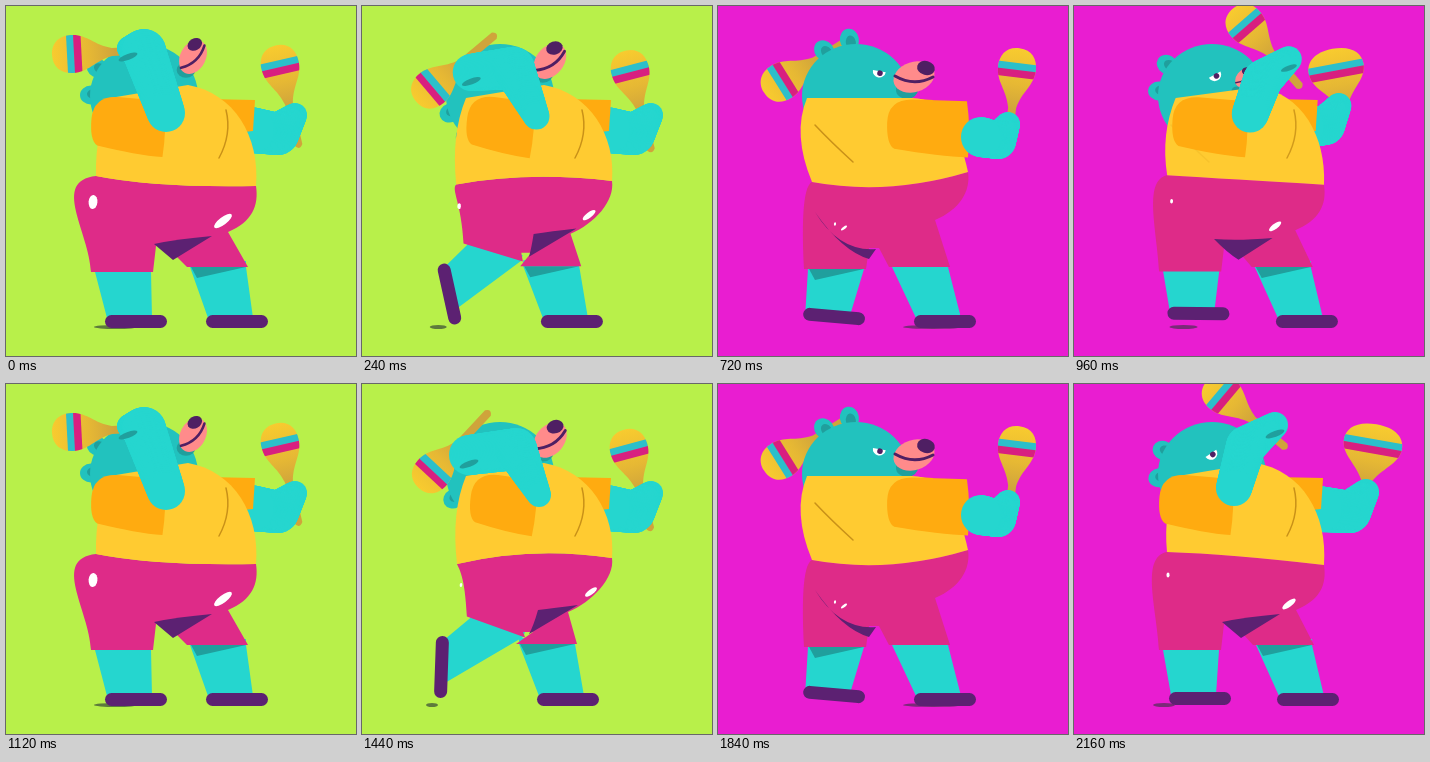
Write an HTML page with a canvas that moves like this. It is 350x350 px and loops after 2.24 s.

```html
<!DOCTYPE html>
<html lang="en">
<head>
<meta charset="utf-8">
<title>Dancing bear with maracas</title>
<style>
html, body { margin: 0; width: 100%; height: 100%; overflow: hidden; background: #b8f04a; }
canvas { display: block; width: 100vw; height: 100vh; }
</style>
</head>
<body>
<canvas id="stage" width="350" height="350"></canvas>
<script>
const ctx = document.getElementById('stage').getContext('2d');
const STEP = 80, STEPS = 14, RAD = Math.PI / 180;
const C = {
  green: '#b8f04a', pink: '#e91dd1', teal: '#25d6cf', head: '#22c2be', deep: '#209f9d',
  shirt: '#ffcb31', sleeve: '#ffab10', shorts: '#de2b88', purple: '#5c2172',
  muzzle: '#ff8b8b', nose: '#4f1f63', fold: '#c99118'
};

// Joints are x, y with an angle, size or radius; arms list hand, wrist, elbow.
const back = {
  lean: [1], head: [-53], muzzle: [187, 51, -45, .85], eye: [142, 62, -40],
  waist: [90, 170, 150, 182, 250, 180], butt: [45], notch: [222, 226], crotch: [155, 240],
  fold: [148, 238, 206, 230, 167, 254],
  hemL: [116, 266, 0], hemR: [211, 261, 0], footL: [130, 316, 0], footR: [231, 316, 0],
  sleeve: [122, 120, 5, 74],
  arm: [122, 42, 11, 138, 45, 22, 160, 107, 19],
  farArm: [289, 109, 12, 272, 128, 21, 245, 124, 23],
  shaker: [66, 48, -3, 1, 0], farShaker: [274, 59, 77, 1, 0],
  glowA: [87, 196, 2], glowB: [217, 215, 1.2], shadow: [110, 22]
};
const kick = {
  ...back, head: [-110], muzzle: [188, 56, -32, .95],
  waist: [95, 180, 170, 162, 250, 174], butt: [97], notch: [206, 228], crotch: [166, 248],
  fold: [176, 226, 216, 221, 167, 250],
  hemL: [134, 243, 20], hemR: [184, 260, 0], footL: [79, 283, 92], footR: [206, 316, 0],
  sleeve: [141, 120, 8, 66], arm: [107, 71, 20, 154, 65, 21, 177, 111, 12],
  shaker: [70, 89, -47, 1, 1], farShaker: [267, 65, 75, 1, 0],
  glowA: [99, 201, .6], glowB: [229, 208, .8], shadow: [70, 6]
};
const front = {
  ...back, lean: [0], head: [-18], muzzle: [193, 77, 0, .9], eye: [162, 68, 0],
  waist: [95, 173, 180, 177, 250, 164], butt: [94], notch: [222, 221],
  fold: [103, 213, 161, 236, 147, 253],
  hemL: [117, 265, 0], hemR: [198, 256, 0], footL: [128, 316, 0], footR: [198, 314, -3],
  sleeve: [205, 121, 5, 63], arm: [207, 58, 18, 225, 70, 22, 230, 98, 19],
  farArm: [262, 77, 12, 245, 95, 12, 235, 110, 10],
  shaker: [106, 60, 0, 1, 0], farShaker: [236, 39, 68, 1.1, 0],
  glowA: [107, 207, .7], glowB: [229, 208, .8], shadow: [186, 25]
};
const stride = {
  ...front, head: [0], muzzle: [196, 71, 0, 1], eye: [161, 67, 10],
  waist: [94, 176, 170, 190, 250, 166], butt: [84], notch: [217, 214], crotch: [156, 242],
  fold: [97, 206, 158, 243, 151, 253],
  hemL: [117, 263, 0], hemR: [201, 261, 0], footL: [116, 311, 5], footR: [227, 316, 0],
  sleeve: [210, 122, 2, 82], arm: [290, 118, 12, 280, 135, 18, 263, 131, 20],
  farArm: [118, 54, 10, 120, 75, 10, 140, 100, 10],
  shaker: [299, 62, 97, 1, 0], farShaker: [63, 76, -32, 1, 0],
  glowA: [117, 218, .5], glowB: [126, 222, .4], shadow: [215, 30]
};
const turn = {
  ...back, head: [-58], muzzle: [165, 72, -40, .4], eye: [138, 71, -35],
  waist: [93, 168, 155, 170, 250, 181], butt: [66],
  hemR: [209, 261, 0], footL: [126, 315, 0], footR: [234, 316, 0],
  arm: [201, 41, 13, 172, 62, 20, 160, 104, 18],
  farArm: [292, 108, 13, 276, 128, 21, 245, 125, 23],
  shaker: [148, 10, 40, 1, 0], farShaker: [299, 60, 100, 1.55, 0],
  glowA: [94, 191, .7], glowB: [215, 220, .9], shadow: [90, 11]
};
const KEYS = [[0, back], [4, kick], [5, front], [9, stride], [13, turn], [14, back]];

function poseAt(step) {
  const k = KEYS.findLastIndex(([at]) => at <= step);
  const [t0, a] = KEYS[k], [t1, b] = KEYS[k + 1];
  const u = (step - t0) / (t1 - t0), e = u * u * (3 - 2 * u), pose = {};
  for (const name in a) pose[name] = a[name].map((v, i) => v + (b[name][i] - v) * e);
  const lift = 9 * Math.sin(Math.PI * u);
  if (a === front) pose.footR[1] -= lift;
  if (a === stride) pose.footL[1] -= lift;
  return pose;
}

function placed(x, y, deg, draw) {
  ctx.save();
  ctx.translate(x, y);
  ctx.rotate(deg * RAD);
  draw();
  ctx.restore();
}

function oval(x, y, rx, ry, color, deg = 0) {
  ctx.beginPath();
  ctx.ellipse(x, y, rx, ry, deg * RAD, 0, 7);
  ctx.fillStyle = color;
  ctx.fill();
}

// Two numbers make a line, four a quadratic and six a cubic curve.
function shape(color, ...segs) {
  ctx.beginPath();
  for (const s of segs) {
    if (s.length === 2) ctx.lineTo(...s);
    else if (s.length === 4) ctx.quadraticCurveTo(...s);
    else ctx.bezierCurveTo(...s);
  }
  ctx.closePath();
  ctx.fillStyle = color;
  ctx.fill();
}

function curve(x0, y0, x1, y1, x2, y2, color, width) {
  ctx.beginPath();
  ctx.moveTo(x0, y0);
  ctx.quadraticCurveTo(x1, y1, x2, y2);
  ctx.strokeStyle = color;
  ctx.lineWidth = width;
  ctx.lineCap = 'round';
  ctx.stroke();
}

const at = ([x, y, deg], dx, dy) => {
  const c = Math.cos(deg * RAD), s = Math.sin(deg * RAD);
  return [x + dx * c - dy * s, y + dx * s + dy * c];
};

// Overlapping discs swept through the joints.
function limb(j) {
  for (let i = 0; i + 3 < j.length; i += 3)
    for (let t = 0; t <= 1.001; t += 1 / 32) {
      const [x, y, r] = [0, 1, 2].map(k => j[i + k] + (j[i + k + 3] - j[i + k]) * t);
      oval(x, y, r, r, C.teal);
    }
}

function leg(hem, foot, shaded) {
  shape(C.teal, at(hem, -27, -6), at(hem, 29, -6), at(hem, 29, 0), at(foot, 16, -4), at(foot, -29, -4), at(hem, -27, 0));
  if (shaded) shape(C.deep, at(hem, -26, 0), at(hem, 29, 0), at(hem, -20, 11));
  placed(...foot, () => {
    ctx.beginPath();
    ctx.roundRect(-31, -7, 62, 13, 6.5);
    ctx.fillStyle = C.purple;
    ctx.fill();
  });
}

function shorts({ waist: [lx, ly, mx, my, rx, ry], butt, notch: [nx, ny], crotch: [cx, cy], hemL, hemR, fold }) {
  const [hx, hy] = at(hemL, -31, 0);
  shape(C.shorts, [lx, ly], [mx, my, rx, ry],
    [rx + 3, ry + 20, nx + 24, ny - 10, nx, ny],
    at(hemR, 31, 0), at(hemR, -30, 0), [cx + 5, cy], [cx - 5, cy], at(hemL, 31, 0), [hx, hy],
    [hx - 2, hy - 41, butt[0], ly + 5, lx, ly]);
  const [ax, ay, bx, by, tx, ty] = fold;
  shape(C.purple, [ax, ay], [ax + .4 * (bx - ax), by + 3, bx, by], [tx, ty], [(ax + tx) / 2, ty - 8, ax, ay]);
}

function shirt({ lean: [s], waist: [lx, ly, mx, my, rx, ry] }) {
  const x = 89 + 15 * s, neck = [194 - 12 * s, 92 - 13 * s];
  shape(C.shirt, [x, 92], [x - 15, 128, lx, ly], [mx, my, rx, ry],
    [242 + 12 * s, 130, 228, 92 - 5 * s, ...neck]);
  ctx.globalAlpha = s;
  curve(220, 104, 226, 128, 213, 152, C.fold, 1.5);
  ctx.globalAlpha = 1 - s;
  curve(97, 119, 112, 135, 135, 156, C.fold, 1.5);
  ctx.globalAlpha = 1;
}

function sleeve([x, y, deg, len]) {
  placed(x, y, deg, () => {
    const h = len / 2;
    shape(C.sleeve, [h - 3, -28], [24 - h, -28], [-h, -27, -h, -4], [-h, 18, 8 - h, 22],
      [h / 2 - 8, 28, h, 28], [h + 2, 0, h - 3, -28]);
  });
}

function shaker([x, y, deg, wide, order]) {
  placed(x, y, deg, () => {
    ctx.scale(1, wide);
    const shade = ctx.createLinearGradient(-20, 0, 85, 0);
    shade.addColorStop(0, '#f8cb2f');
    shade.addColorStop(.35, '#e6b834');
    shade.addColorStop(.6, '#cfa43b');
    const grip = 4 / wide, end = Math.max(50, 88 / wide ** 2);
    shape(shade, [-20, 0], [-20, -13, -11, -19, 0, -19], [16, -19, 22, -8, 40, -grip],
      [end - 6, -grip], [end, 0, end - 6, grip], [40, grip],
      [22, 8, 16, 19, 0, 19], [-11, 19, -20, 13, -20, 0]);
    ctx.clip();
    const bands = ['#2cbfca', '#d81f80'];
    if (order > .5) bands.reverse();
    bands.forEach((color, i) => {
      ctx.fillStyle = color;
      ctx.fillRect(-5 + 7 * i, -20, 7.5, 40);
    });
  });
}

function head({ head: [tilt], eye, muzzle: [mx, my, deg, size] }) {
  for (const side of [-9, -38])
    placed(140, 88, tilt + side, () => {
      oval(0, -55, 9.5, 11, C.head);
      oval(1, -52, 5, 7, C.deep);
    });
  oval(138, 90, 54, 52, C.head);
  oval(mx - 7, my + 13, 11 * size, 9 * size, C.deep);
  placed(...eye, () => {
    ctx.beginPath();
    ctx.arc(0, -2, 6.5, 0, Math.PI);
    ctx.fillStyle = '#fff';
    ctx.fill();
    oval(1, 0, 2.8, 2.8, C.nose);
  });
  placed(mx, my, deg, () => {
    ctx.scale(size, size);
    oval(0, 0, 21, 15, C.muzzle, -18);
    oval(12, -9, 9, 7, C.nose, 15);
    curve(-19, -1, 0, 10, 19, 0, C.nose, 3);
  });
}

function draw(step) {
  const p = poseAt(step), [s] = p.lean;
  ctx.fillStyle = step < 7 ? C.green : C.pink;
  ctx.fillRect(0, 0, 350, 350);
  oval(p.shadow[0], 321, p.shadow[1], 2, step < 7 ? '#5d7a3c' : '#7b2a78');

  shaker(p.farShaker);
  limb(p.farArm);
  const edge = 215 + 34 * s;
  shape(C.sleeve, [200, 93], [edge, 94], [edge - 2, 125], [200, 130]);

  leg(p.hemL, p.footL, s < .5);
  leg(p.hemR, p.footR, s >= .5);
  shorts(p);
  const [ax, ay, a] = p.glowA, [bx, by, b] = p.glowB;
  oval(ax, ay, 2.2 * a, 3.5 * a, '#fff', 5);
  oval(bx, by, 9 * b, 3.2 * b, '#fff', -37);

  head(p);
  shirt(p);
  sleeve(p.sleeve);
  shaker(p.shaker);
  limb(p.arm);
  oval(p.arm[0], p.arm[1] + 9, 10 * s, 3 * s, C.deep, -20);
}

let shown = -1;
const start = performance.now();
function tick() {
  const step = Math.floor((performance.now() - start) / STEP) % STEPS;
  if (step !== shown) draw(shown = step);
  requestAnimationFrame(tick);
}
tick();
</script>
</body>
</html>
```
